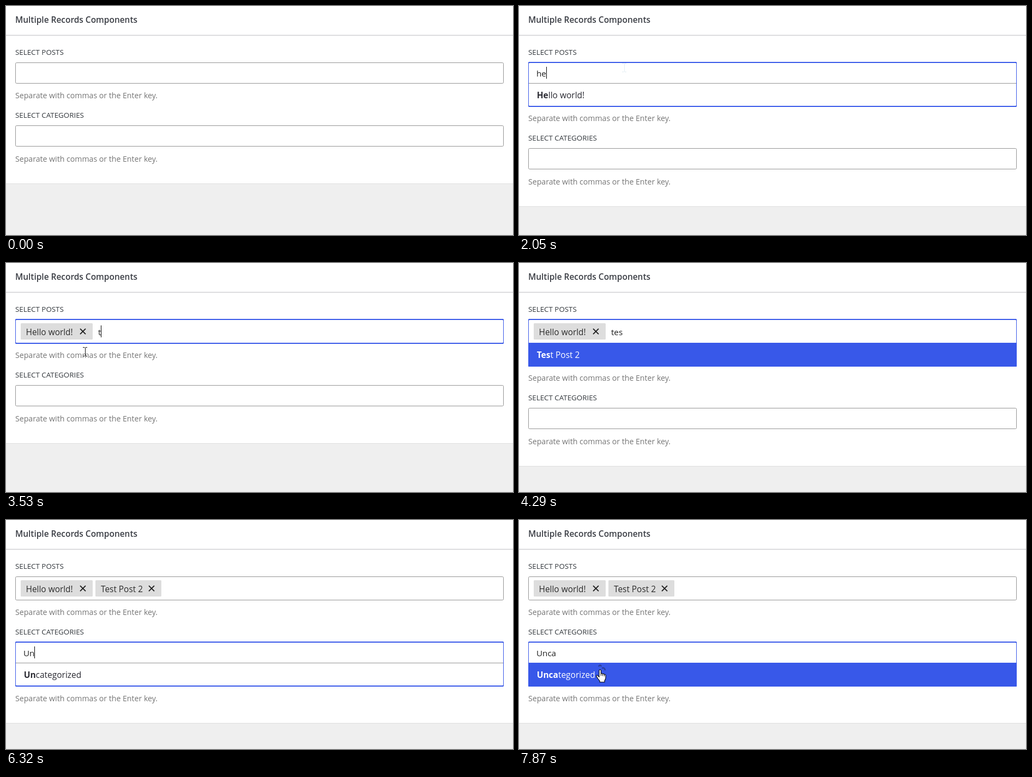
Animation, 930 px wide and 422 px high, one loop 8000 ms. Source, as an HTML page:

```html
<!DOCTYPE html>
<html lang="en">
<head>
<meta charset="utf-8">
<title>Multiple Records Components</title>
<style>
html, body { margin: 0; width: 100%; height: 100%; overflow: hidden; background: #fff; }
svg { display: block; width: 930px; height: 422px; font-family: "Open Sans", "Noto Sans", sans-serif; }
text { white-space: pre; }
.title { font-size: 15.45px; font-weight: 600; fill: #3a3d44; }
.label { font-size: 13.35px; fill: #32373c; }
.help { font-size: 14.13px; fill: #757575; }
.input { font-size: 15.2px; fill: #1e1e1e; }
.option { font-size: 15.5px; }
.chip { font-size: 15.4px; fill: #2c2c2c; }
.match { font-weight: 700; }
</style>
</head>
<body>
<svg id="stage" viewBox="0 0 930 422"></svg>
<script>
const LOOP = 8000, STEP = 70, BLUE = '#3858e9';
const stage = document.getElementById('stage');

function el(parent, tag, attrs = {}, text = '') {
  const node = document.createElementNS('http://www.w3.org/2000/svg', tag);
  set(node, attrs);
  node.textContent = text;
  return parent.appendChild(node);
}
function set(node, attrs) {
  for (const key in attrs) node.setAttribute(key, attrs[key]);
}
const show = (node, on) => set(node, { visibility: on ? 'visible' : 'hidden' });
const shift = (node, x, y) => set(node, { transform: `translate(${x} ${y})` });
const within = (spans, t) => spans.some(([from, to]) => t >= from && t < to);

// Value of the last [time, value] pair that has been reached.
function at(track, t) {
  let value = track[0][1];
  for (const [time, v] of track) if (t >= time) value = v;
  return value;
}

const posts = {
  focus: [[920, 5590]],
  typed: [[0, ''], [1850, 'h'], [1920, 'he'], [2120, 'hel'], [2190, 'hell'], [3260, ''],
    [3530, 't'], [3610, 'te'], [3690, 'tes'], [4830, '']],
  match: [[0, 0], [2050, 2], [2190, 3], [2250, 4], [3260, 0], [4290, 3], [4830, 0]],
  option: [[0, 'Hello world!'], [3260, 'Test Post 2']],
  caret: [[920, 1450], [1850, 2510], [3040, 4140], [4670, 5360]],
  chips: [[0, 0], [3260, 1], [4830, 2]]
};
const categories = {
  focus: [[5590, LOOP]],
  typed: [[0, ''], [6060, 'U'], [6190, 'Un'], [6450, 'Unc'], [6650, 'Unca']],
  match: [[0, 0], [6320, 2], [6450, 3], [6720, 4]],
  option: [[0, 'Uncategorized']],
  caret: [[5590, 7250]],
  chips: [[0, 0]]
};
const path = [
  [450, 200, 187], [800, 194, 114], [2770, 194, 114], [3050, 145, 163],
  [3530, 145, 163], [3740, 236, 161], [4550, 236, 161], [4830, 197, 171],
  [5170, 197, 171], [5520, 185, 236], [7250, 185, 236], [7870, 149, 276]
];
const pointerShown = [[450, 1850], [2770, 3940], [4550, 6060], [7250, LOOP]];
const clicks = [[870, 1000], [3120, 3330], [4760, 4900], [5520, 5730]];

// The pointer moves in small steps, like a screen recording.
function pointerAt(t) {
  let i = 0;
  while (i < path.length - 1 && t >= path[i + 1][0]) i++;
  const [t0, x0, y0] = path[i];
  const [t1, x1, y1] = path[i + 1] || [t0 + 1, x0, y0];
  const u = Math.max(0, Math.floor((t - t0) / STEP) * STEP / (t1 - t0));
  const e = Math.min(1, u * u * (3 - 2 * u));
  return { x: Math.round(x0 + (x1 - x0) * e), y: Math.round(y0 + (y1 - y0) * e) };
}

function makeChip(parent, x, width, textX, label) {
  const g = el(parent, 'g');
  el(g, 'rect', { x, y: 7, width, height: 30, rx: 1.5, fill: '#ddd' });
  el(g, 'text', { class: 'chip', x: textX, y: 29 }, label);
  const cross = x + width - 18;
  el(g, 'path', {
    d: `M${cross - 5} 17.2l10 10m0-10l-10 10`, stroke: '#1e1e1e', 'stroke-width': 1.9, fill: 'none'
  });
  return g;
}

function makeField(name, helpGap, chips) {
  const g = el(stage, 'g');
  const f = { g, helpGap };
  el(g, 'text', { class: 'label', x: 17, y: -14 }, name);
  f.box = el(g, 'rect', { x: 17.5, y: .5, width: 895, rx: 2, fill: '#fff', stroke: '#949494' });
  f.ring = el(g, 'path', { fill: BLUE, 'fill-rule': 'evenodd' });
  f.line = el(g, 'rect', { x: 18, width: 894, height: 1, fill: '#949494' });
  f.hover = el(g, 'rect', { x: 17, width: 896, height: 44, rx: 1, fill: BLUE });
  f.chips = chips.map(c => makeChip(g, ...c));
  f.input = el(g, 'text', { class: 'input' });
  f.caret = el(g, 'rect', { width: 1, height: 22, fill: '#000' });
  f.option = el(g, 'text', { class: 'option', x: 32.7 });
  f.match = el(f.option, 'tspan', { class: 'match' });
  f.rest = el(f.option, 'tspan');
  f.help = el(g, 'text', { class: 'help', x: 17 }, 'Separate with commas or the Enter key.');
  return f;
}

// Draws a field and returns how far it has grown.
function drawField(f, track, top, t, pointer) {
  const focused = within(track.focus, t);
  const chips = at(track.chips, t), match = at(track.match, t);
  const text = at(track.typed, t), option = at(track.option, t);
  const height = chips ? 44 : 39, drop = match ? 42 : 0;
  const hover = match > 0 && pointer.y > top + height - 1;
  const end = height + (match ? 43 : 1);
  const x = [32, 169, 295][chips], drift = chips ? 3 : 0;

  shift(f.g, 0, top);
  set(f.box, { height: height - 1 + drop });
  set(f.ring, { d: `M18-1H912L913 0V${end - 1}L912 ${end}H18L17 ${end - 1}V0ZM18 1V${end - 2}H912V1Z` });
  show(f.ring, focused);
  set(f.line, { y: height - 1 });
  show(f.line, match > 0 && !hover);
  set(f.hover, { y: height - 1 });
  show(f.hover, hover);
  f.chips.forEach((chip, i) => show(chip, i < chips));

  set(f.input, { x, y: 26 + drift });
  f.input.textContent = text;
  const width = text ? f.input.getComputedTextLength() : 0;
  set(f.caret, { x: Math.round(x + width), y: 8 + drift });
  show(f.caret, focused && within(track.caret, t));

  set(f.option, { y: height + 27, fill: hover ? '#fff' : '#2a2a32' });
  f.match.textContent = option.slice(0, match);
  f.rest.textContent = option.slice(match);
  show(f.option, match > 0);
  set(f.help, { y: height + f.helpGap + drop });
  return { grow: height - 39 + drop, hover };
}

el(stage, 'rect', { width: 930, height: 422, fill: '#fff' });
el(stage, 'text', { class: 'title', x: 17, y: 31 }, 'Multiple Records Components');
el(stage, 'rect', { y: 53, width: 930, height: 2, fill: '#dcdcde' });
const footer = el(stage, 'g');
el(footer, 'rect', { width: 930, height: 422, fill: '#efefef' });
el(footer, 'rect', { width: 930, height: 1, fill: '#dedede' });

const postField = makeField('SELECT POSTS', 27, [
  [27, 132, 36.6, 'Hello world!'], [164, 121, 174, 'Test Post 2']
]);
const categoryField = makeField('SELECT CATEGORIES', 28, []);

const beamShape = 'M-4-7.5h3l1 1 1-1h3M.5-6.5v14M-4 8.5h3l1-1 1 1h3';
const trail = el(stage, 'path', {
  d: beamShape, fill: 'none', stroke: '#cfe0ea', opacity: .6, transform: 'translate(193 113)'
});
const smudge = el(stage, 'path', {
  d: 'M146 270q3-5 5 0M152 273q5-2 6 4', fill: 'none', stroke: '#2a3f9e', 'stroke-width': 2.5
});
const beam = el(stage, 'path', { d: beamShape, fill: 'none', stroke: '#111' });
const hand = el(stage, 'g');
el(hand, 'path', {
  d: 'M-2 1.5a1.7 1.7 0 0 1 3.4 0V7q2.2-1 3 .8 2.2-.8 3 .8 2.6-.4 2.6 2.2v4q0 3-2 5v3h-9v-2.5' +
    'q-4-4-6-8.5-.3-2.4 2-1.7l3 3.4z',
  fill: '#fff', stroke: '#000', 'stroke-width': 1.1, 'stroke-linejoin': 'round'
});
el(hand, 'path', { d: 'M1.4 7v4M4.4 8v3.5M7.4 9v3', stroke: '#000' });
const spot = el(stage, 'circle', { r: 15, cx: -2, cy: -1, fill: '#ff0', opacity: .5 });

function draw(t) {
  const pointer = pointerAt(t);
  const first = drawField(postField, posts, 104, t, pointer);
  const second = drawField(categoryField, categories, 220 + first.grow, t, pointer);
  shift(footer, 0, 327 + first.grow + second.grow);

  const shown = within(pointerShown, t), over = first.hover || second.hover;
  for (const node of [beam, hand, spot]) shift(node, pointer.x, pointer.y);
  show(beam, shown && !over);
  show(hand, shown && over);
  show(spot, within(clicks, t));
  show(trail, within([[1850, 3260]], t));
  show(smudge, t >= 7870);
}

function frame(now) {
  draw(now % LOOP);
  requestAnimationFrame(frame);
}
requestAnimationFrame(frame);
</script>
</body>
</html>
```
